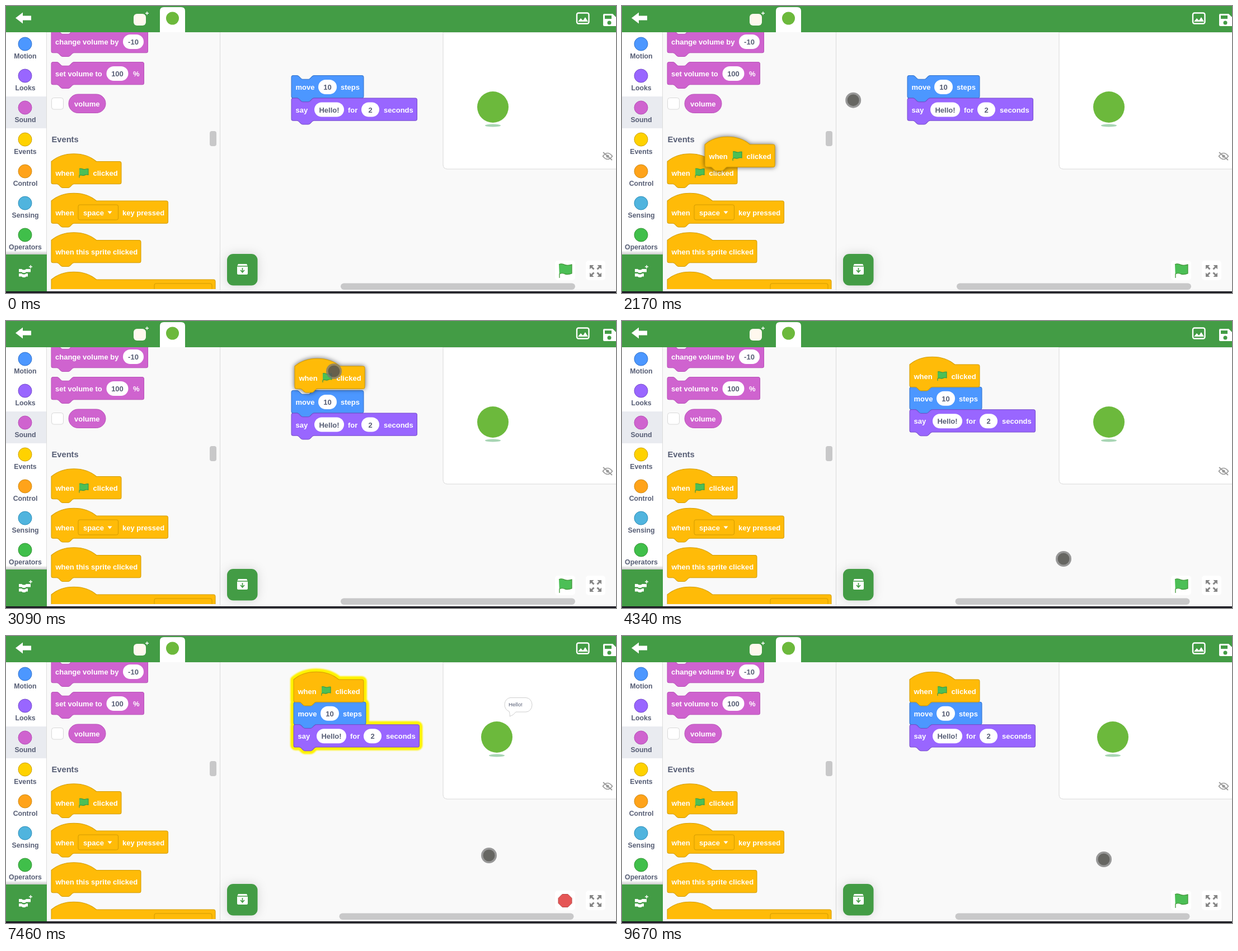
Write an HTML page that moves like this. It is 1090 px wide and 514 px high and loops after 9710 ms.

```html
<!DOCTYPE html>
<html lang="en">
<head>
<meta charset="utf-8">
<title>Block coding</title>
<style>
  html, body { margin: 0; width: 100%; height: 100%; overflow: hidden; background: #f9f9f9; }
  svg { display: block; width: 1090px; height: 514px; }
  text { font: bold 13px "Liberation Sans", Arial, sans-serif; fill: #fff; }
  .value { fill: #575e75; text-anchor: middle; }
  .label { font-size: 12.3px; fill: #575e75; text-anchor: middle; }
  .heading { font-size: 14.7px; fill: #575e75; }
  .bubble { font-size: 9.8px; font-weight: normal; fill: #575e75; }
  .lifted { filter: drop-shadow(0 0 4px rgba(0, 0, 0, .6)); }
  .fab { filter: drop-shadow(0 0 9px rgba(0, 0, 0, .14)); }
  .glow { fill: #fff200; stroke: #fff200; stroke-width: 14; stroke-linejoin: round; }
  #glow { filter: blur(.8px); }
</style>
</head>
<body>
<svg id="scene" viewBox="0 0 1090 514" xmlns="http://www.w3.org/2000/svg"></svg>
<script>
const LOOP = 9710, SCALE = .84, GREEN = '#439c45', BAR = '#c8c8c9';
const MOTION = ['#4c97ff', '#3373cc'], LOOKS = ['#9966ff', '#774dcb'],
      SOUND = ['#cf63cf', '#b850b8'], EVENTS = ['#ffbb08', '#d29b00'];

const at = (x, y, inner, attrs = '') => `<g transform="translate(${x} ${y})" ${attrs}>${inner}</g>`;
const text = (x, y, value, cls = '') => `<text x="${x}" y="${y}" class="${cls}">${value}</text>`;
const rect = (x, y, w, h, r, fill, extra = '') =>
  `<rect x="${x}" y="${y}" width="${w}" height="${h}" rx="${r}" fill="${fill}" ${extra}/>`;
const path = (d, fill, extra = '') => `<path d="${d}" fill="${fill}" ${extra}/>`;

// Outline of a stackable block; the hat variant has a domed top.
function outline(width, hat, attrs) {
  const w = width / SCALE;
  const start = hat ? 'M0 0c25-22 71-22 96 0'
    : 'M0 4a4 4 0 0 1 4-4H12c2 0 3 1 4 2l4 4c1 1 2 2 4 2h12c2 0 3-1 4-2l4-4c1-1 2-2 4-2';
  const d = `${start}H${w - 4}a4 4 0 0 1 4 4V44a4 4 0 0 1-4 4H48c-2 0-3 1-4 2l-4 4c-1 1-2 2-4 2` +
    'h-12c-2 0-3-1-4-2l-4-4c-1-1-2-2-4-2H4a4 4 0 0 1-4-4z';
  return `<path d="${d}" transform="scale(${SCALE})" ${attrs}/>`;
}
const block = (x, y, width, [fill, stroke], inner, hat = false) =>
  at(x, y, outline(width, hat, `fill="${fill}" stroke="${stroke}" stroke-width="1.2"`) + inner);
const input = (x, w, value) => rect(x, 7.5, w, 26, 13, '#fff') + text(x + w / 2, 25.5, value, 'value');
const dropdown = (x, w, value) =>
  rect(x, 7, w, 27, 3, EVENTS[0], `stroke="${EVENTS[1]}"`) + text(x + 9, 25.5, value) +
  path(`M${x + w - 19} 18.5h8l-4 5z`, '#fff');

const blockFlag = path('M50 13c4-2 6 2 10 1 3-1 4-1 6-1v11c-5-2-7 2-10 1-3-1-4-1-6 0v4', '#4cbf56',
  'stroke="#399a45" stroke-width="1.2" stroke-linejoin="round"');
const flagBlock = (x, y) =>
  block(x, y, 125, EVENTS, text(7.5, 25.5, 'when') + blockFlag + text(74.5, 25.5, 'clicked'), true);

const categories = [
  ['Motion', '#4c97ff', '#3373cc'], ['Looks', '#9966ff', '#774dcb'], ['Sound', '#cf63cf', '#b850b8'],
  ['Events', '#ffd200', '#cca000'], ['Control', '#ffa31a', '#cf8b17'], ['Sensing', '#50b4de', '#2e8eb8'],
  ['Operators', '#40bf4a', '#389438']
].map(([name, fill, stroke], i) => {
  const y = 68 + 57 * i;
  return `<circle cx="34" cy="${y}" r="12" fill="${fill}" stroke="${stroke}"/>` + text(34.5, y + 26, name, 'label');
}).join('');

const header = rect(0, 0, 1090, 47, 0, GREEN) +
  path('M17 21.5l13-10v6h15v8H30v6z', '#fff') +
  rect(228, 14, 22, 21, 6, '#fff8ee') +
  path('M249 13h6M252 10v6', 'none', 'stroke="#fff" stroke-width="1.3"') +
  path('M275 47V9q0-7 7-7h31q7 0 7 7v38z', '#fff') +
  '<circle cx="297.500" cy="22" r="11.500" fill="#6cb93c"/>' +
  rect(1020, 12.5, 21.5, 19, 3, 'none', 'stroke="#fff" stroke-width="2.400"') +
  path('M1022 28l5-6 4 4 4-6 5 8z', '#fff') +
  path('M1069 14h15l6 6v16h-21q-2 0-2-2V16q0-2 2-2z', '#fff') +
  path('M1070 17h12v6h-12z', GREEN) + `<circle cx="1078" cy="30" r="3.500" fill="${GREEN}"/>`;

const palette = `<g clip-path="url(#paletteClip)">` +
  block(81, 43.5, 172.5, SOUND, text(7, 25.5, 'change volume by') + input(128, 37, '-10')) +
  block(81, 100.5, 165.5, SOUND, text(7, 25.5, 'set volume to') + input(98.5, 39, '100') + text(146, 25.5, '%')) +
  rect(81.5, 164.5, 21, 20.5, 4, '#fff', 'stroke="#d8d8d8"') +
  rect(112, 158, 66, 33.5, 16.7, SOUND[0], `stroke="${SOUND[1]}"`) + text(122, 179.5, 'volume') +
  text(81.5, 244, 'Events', 'heading') +
  flagBlock(81, 278.5) +
  block(81, 349, 208.5, EVENTS, text(7.5, 25.5, 'when') + dropdown(48, 71.5, 'space') + text(127, 25.5, 'key pressed'), true) +
  block(81, 419.5, 160, EVENTS, text(7.5, 25.5, 'when this sprite clicked'), true) +
  block(81, 490, 293, EVENTS, text(7.5, 25.5, 'when backdrop switches to') + dropdown(184, 103, 'backdrop1'), true) +
  '</g>' + rect(364, 224, 12, 27, 4, BAR);

const sidebar = rect(0, 47, 72, 464, 0, '#fff') + rect(0, 162, 72, 57, 0, '#e9ebf0') + categories +
  rect(72, 47, 1, 464, 0, '#dcdcdc') +
  rect(0, 438, 73, 7, 0, 'url(#fade)') + rect(0, 445, 73, 66, 0, GREEN) +
  path('M23 471h5l2 1.500h4l2-1.500h8v5.500h-8l-2 1.500h-4l-2-1.500h-5z' +
    'M23 479h5l2 1.500h4l2-1.500h3v5.500h-3l-2 1.500h-4l-2-1.500h-5z', '#fff') +
  path('M41 467h6M44 464v6', 'none', 'stroke="#fff" stroke-width="1.400"');

const archive = at(395, 444, rect(0, 0, 54.5, 56.5, 11, GREEN, 'class="fab"') +
  path('M18 22l2-4h15l2 4v13q0 2-2 2H20q-2 0-2-2z', '#fff') +
  path('M18 22h19M27.500 25v7M24 29l3.500 4 3.500-4', 'none', `stroke="${GREEN}" stroke-width="1.700"`));

const arrows = [0, 90, 180, 270].map(a =>
  `<g transform="rotate(${a})"><path d="M3 3l5 5" stroke="#868686" stroke-width="3"/>` +
  path('M10.500 3v7.500H3z', '#868686') + '</g>').join('');

const stage = path('M1092 47H781V284q0 8 8 8H1092z', '#fff', 'stroke="#d9d9d9"') +
  `<g id="sprite"><ellipse cx="870" cy="214" rx="14" ry="2.500" fill="#a8d5b4"/>` +
  `<circle cx="870" cy="181" r="28" fill="#6cb93c"/></g>` +
  `<g id="speech">` + path('M901 110.500H929a11 12.700 0 0 1 0 25.500H911q-4 6-11 8 1-2-1-9a11 12.500 0 0 1 2-24.500z',
    '#fff', 'stroke="#cfcfcf"') + text(898, 126, 'Hello!', 'bubble') + '</g>' +
  at(1075, 269, path('M-8.500 0q8.500-11 17 0-8.500 11-17 0zM-8-7L8 7', 'none', 'stroke="#999" stroke-width="1.700"') +
    '<circle r="2.600" fill="#999"/>');

const controls = rect(981, 456, 36, 35, 5, '#fff') + rect(1036, 456, 35, 35, 5, '#fff') +
  at(1053.5, 474.5, arrows) +
  path('M988 463c5-3 8 0 12 1 4 1 7 0 11-1v16c-5 2-8 2-12 1-4-2-7-2-10 0v7', '#4cbf56',
    'id="go" stroke="#45993d" stroke-width="1.300" stroke-linejoin="round"') +
  path('M994 462.500h10l7 7v9l-7 7h-10l-7-7v-9z', '#e55656', 'id="stop" stroke="#b84848"');

const script = `<g id="glow">` +
  at(514, 78, outline(125, true, 'class="glow"')) + at(514, 118.3, outline(129, false, 'class="glow"')) +
  at(514, 158.5, outline(224.5, false, 'class="glow"')) + '</g><g id="stack">' +
  block(510, 124.5, 129, MOTION, text(7.5, 25.5, 'move') + input(48, 33, '10') + text(88, 25.5, 'steps')) +
  block(510, 165, 224.5, LOOKS, text(7.5, 25.5, 'say') + input(41, 53, 'Hello!') + text(101, 25.5, 'for') +
    input(125, 32, '2') + text(165, 25.5, 'seconds')) + '</g>';

document.getElementById('scene').innerHTML =
  `<defs><clipPath id="paletteClip"><rect x="73" y="47" width="309" height="460"/></clipPath>
   <linearGradient id="fade" x2="0" y2="1"><stop stop-color="#888" stop-opacity="0"/>
   <stop offset="1" stop-color="#888" stop-opacity=".45"/></linearGradient></defs>` +
  rect(0, 0, 1090, 514, 0, '#f9f9f9') + rect(0, 511, 1090, 3, 0, '#1d1d24') +
  palette + rect(382, 47, 1, 464, 0, '#d9d9d9') + sidebar + script + stage + archive +
  rect(598, 496.5, 419, 11.5, 5.7, BAR, 'id="scroll"') + controls + header +
  `<g id="hat">${flagBlock(0, 0)}</g>` +
  `<g id="cursor"><circle r="14" fill="#777" opacity=".75"/><circle r="10.500" fill="#4c4b45" opacity=".65"/></g>`;

// Each key is [time, x, y].
const cursorKeys = [
  [40, 480, 345], [780, 151, 288], [1750, 151, 288], [2490, 586, 90], [3180, 586, 90],
  [3560, 789, 426], [4540, 789, 426], [6180, 996, 477], [6960, 996, 477], [7460, 863, 393], [7860, 861, 400]
];
const hatKeys = [[1970, 81, 278.5], [2780, 516, 81]];
const GRAB = 1760, DROP = 3220, RUN = 6960, DONE = 8960;

function sample(keys, t) {
  const next = keys.findIndex(k => k[0] > t);
  if (next < 0) return keys[keys.length - 1].slice(1);
  if (next === 0) return keys[0].slice(1);
  const [t0, x0, y0] = keys[next - 1], [t1, x1, y1] = keys[next];
  const u = (t - t0) / (t1 - t0), e = u * u * (3 - 2 * u);
  return [x0 + (x1 - x0) * e, y0 + (y1 - y0) * e];
}

const parts = {};
for (const el of document.querySelectorAll('[id]')) parts[el.id] = el;
const show = (id, on) => { parts[id].style.display = on ? '' : 'none'; };
const place = (id, x, y) => parts[id].setAttribute('transform', `translate(${x} ${y})`);

function render(t) {
  const dropped = t >= DROP, running = t >= RUN && t < DONE;
  place('cursor', ...sample(cursorKeys, t));
  show('cursor', t >= 40);
  place('hat', ...(dropped ? [514, 78] : sample(hatKeys, t)));
  show('hat', t >= GRAB);
  parts.hat.classList.toggle('lifted', !dropped);
  place('stack', dropped ? 4 : 0, dropped ? -6.3 : 0);
  place('scroll', dropped ? -2.5 : 0, 0);
  place('sprite', t >= RUN ? 7 : 0, 0);
  for (const id of ['glow', 'speech', 'stop']) show(id, running);
  show('go', !running);
}

const begin = performance.now();
function tick() {
  render((performance.now() - begin) % LOOP);
  requestAnimationFrame(tick);
}
tick();
</script>
</body>
</html>
```
